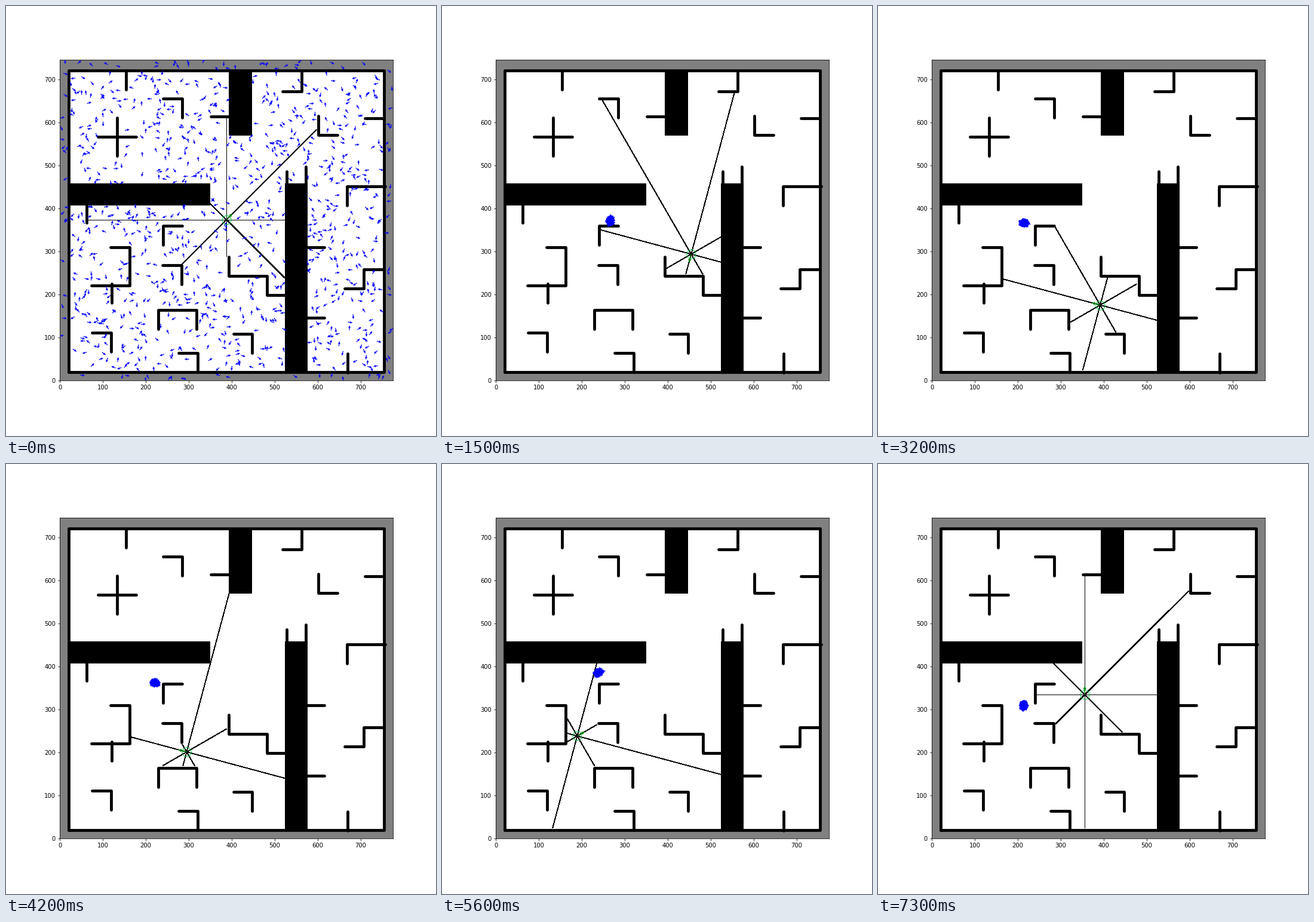
Write a matplotlib script that moves like this. It is 720x720 px and loops after 7400 ms.

```python
import numpy as np
import matplotlib.pyplot as plt
from matplotlib.animation import FuncAnimation
from matplotlib.collections import LineCollection
from matplotlib.patches import Rectangle

W, H = 775, 746
PX = 0.72            # screen pixels per map unit
FRAMES = 74
N = 1000             # particles
WALL = 6.7           # wall thickness in map units
CLEARANCE = 1.4      # rays stop this far from a wall
UNIT = 44.4          # every wall is a chain of pieces this long

LEFT, RIGHT, BOTTOM, TOP = 21, 754.5, 19.5, 720.5
STEP = {"R": (1, 0), "L": (-1, 0), "U": (0, 1), "D": (0, -1)}

# left, bottom, right, top
BLOCKS = [(392.5, 569.5, 447, TOP), (LEFT, 407.5, 349.5, 458.5),
          (523, BOTTOM, 576, 459)]

# each wall: start point, then pieces to the right, left, up or down
CHAINS = [
    (154.5, TOP, "D"), (240, 656, "RD"), (351, 613.5, "R"),
    (517.5, 673, "RU"), (134, 611.5, "DD"), (89.5, 566.5, "RR"),
    (601.5, 615, "DR"), (710, 610.5, "R"), (527.5, 486, "D"),
    (572, 498, "D"), (668.5, 407.5, "URR"), (62.5, 411, "D"),
    (571, 310, "R"), (571, 145.5, "R"), (662.5, 214.5, "RUR"),
    (670, 62.5, "D"), (240.5, 316, "UR"), (239, 267.5, "RD"),
    (117.5, 310, "RDDLL"), (120.5, 225, "D"), (75, 110.5, "RD"),
    (229, 120, "URRD"), (276, 63.5, "RD"), (392.5, 287.5, "DRRDR"),
    (403.5, 108, "RD"),
]

# frame of the turn, new heading, then distance per frame
LEGS = [(1, -15, 12.2), (9, -105, 10.05), (29, 165, 10), (55, 30, 12),
        (73, 90, 0)]

# estimated position: frame, x, y
GUESS = np.array([(8, 272, 350), (23, 260, 397), (32, 215, 366.5),
                  (42, 221.5, 362), (56, 239, 386), (73, 214, 309.5)])


def chain(x, y, moves):
    pts = [(x, y)]
    for m in moves:
        dx, dy = STEP[m]
        x, y = x + dx * UNIT, y + dy * UNIT
        pts.append((x, y))
    return pts


WALLS = [chain(*c) for c in CHAINS]
WALLS.append([(LEFT, BOTTOM), (RIGHT, BOTTOM), (RIGHT, TOP), (LEFT, TOP),
              (LEFT, BOTTOM)])


def build_grid():
    gy, gx = np.mgrid[0:H, 0:W]
    grid = np.zeros((H, W), bool)
    for x0, y0, x1, y1 in BLOCKS:
        grid |= (gx >= x0) & (gx <= x1) & (gy >= y0) & (gy <= y1)
    for line in WALLS:
        for (xa, ya), (xb, yb) in zip(line, line[1:]):
            dx = gx - np.clip(gx, min(xa, xb), max(xa, xb))
            dy = gy - np.clip(gy, min(ya, yb), max(ya, yb))
            grid |= np.hypot(dx, dy) <= WALL / 2 + CLEARANCE
    return grid


GRID = build_grid()


def is_wall(x, y):
    col = np.clip(np.rint(x).astype(int), 0, W - 1)
    row = np.clip(np.rint(y).astype(int), 0, H - 1)
    return GRID[row, col]


def pose(i):
    """Drive along the legs; the frame of a turn is spent on the spot."""
    x, y, angle = 387.6, 374.2, 45
    ends = [leg[0] for leg in LEGS[1:]] + [FRAMES]
    for (turn, new_angle, speed), end in zip(LEGS, ends):
        if i < turn:
            break
        angle = new_angle
        dist = speed * (min(i, end - 1) - turn)
        x += dist * np.cos(np.radians(angle))
        y += dist * np.sin(np.radians(angle))
    return x, y, np.radians(angle)


def cast_rays(x, y, angle):
    t = np.arange(1000)
    rays = []
    for a in angle + np.arange(8) * np.pi / 4:
        c, s = np.cos(a), np.sin(a)
        d = np.argmax(is_wall(x + t * c, y + t * s))
        rays.append([(x, y), (x + d * c, y + d * s)])
    return rays


def scatter_free():
    rng = np.random.default_rng(7)
    pts = rng.uniform((2, 2), (W - 2, H - 2), (2 * N, 2))
    return pts[~is_wall(pts[:, 0], pts[:, 1])][:N]


START = scatter_free()


def particles(i, heading):
    rng = np.random.default_rng(100 + i)
    angles = rng.uniform(0, 2 * np.pi, N)
    if i == 0:
        return START, angles
    # hypotheses die out quickly until one cloud is left
    count = max(1, 240 // 4**i)
    centres = START[:count].copy()
    centres[0] = [np.interp(i, GUESS[:, 0], c) for c in GUESS.T[1:]]
    along, across = rng.normal(0, 1, (2, N)) * [[3], [2.2]]
    c, s = np.cos(heading), np.sin(heading)
    spread = np.column_stack((along * c - across * s, along * s + across * c))
    return centres[rng.integers(count, size=N)] + spread, angles


fig = plt.figure(figsize=(10, 10), dpi=72, facecolor="white")
ax = fig.add_axes([90 / 720, 93 / 720, 558 / 720, 537 / 720])
ax.set(xlim=(0, W), ylim=(0, H), facecolor="#808080",
       xticks=range(0, 800, 100), yticks=range(0, 800, 100))

ax.add_patch(Rectangle((LEFT, BOTTOM), RIGHT - LEFT, TOP - BOTTOM,
                       color="white", lw=0, zorder=0))
for x0, y0, x1, y1 in BLOCKS:
    ax.add_patch(Rectangle((x0, y0), x1 - x0, y1 - y0,
                           color="black", lw=0, zorder=1))
for line in WALLS:
    ax.plot(*zip(*line), color="black", lw=WALL * PX, zorder=1,
            solid_capstyle="round", solid_joinstyle="round")

rays = LineCollection([], colors="black", linewidths=0.8,
                      antialiaseds=False, zorder=2)
ax.add_collection(rays, autolim=False)
cloud = ax.quiver(START[:, 0], START[:, 1], np.ones(N), np.zeros(N),
                  color="blue", pivot="mid", units="dots", width=1.2,
                  scale_units="dots", scale=1 / 8, headwidth=3.4,
                  headlength=3.6, headaxislength=3.4, zorder=3)
ring, = ax.plot([], [], "o", ms=15, mfc="none", mec="#10c850", mew=1.1,
                zorder=4)
arrow = ax.quiver([0], [0], [1], [0], color="green", units="dots",
                  width=1.5, scale_units="dots", scale=1 / 15,
                  headwidth=3.6, headlength=4.2, headaxislength=4,
                  zorder=5)


def update(i):
    x, y, a = pose(i)
    rays.set_segments(cast_rays(x, y, a))
    ring.set_data([x], [y])
    arrow.set_offsets([(x, y)])
    arrow.set_UVC([np.cos(a)], [np.sin(a)])
    pts, angles = particles(i, a)
    cloud.set_offsets(pts)
    cloud.set_UVC(np.cos(angles), np.sin(angles))
    return rays, cloud, ring, arrow


anim = FuncAnimation(fig, update, frames=FRAMES, interval=100,
                     repeat=True, repeat_delay=0, blit=False)
plt.show()
```
